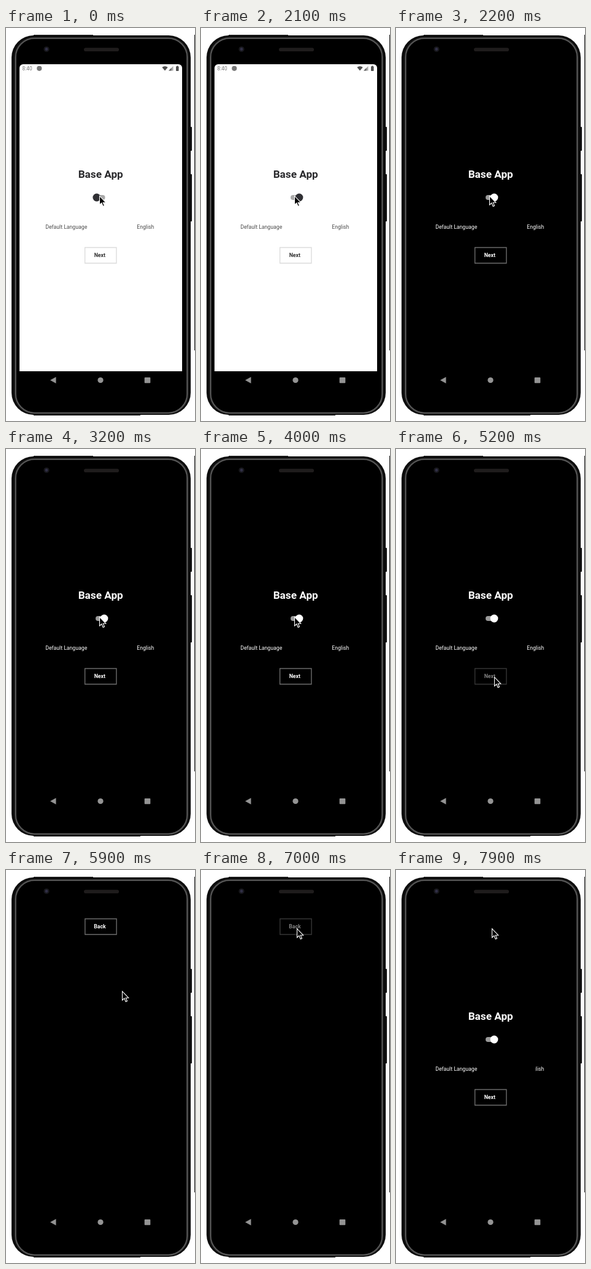
Recreate the animation shown at these times as an HTML page with a canvas. Size 308 by 640 pixels, loop 8000 ms.

```html
<!DOCTYPE html>
<html lang="en">
<head>
<meta charset="utf-8">
<title>Theme switch demo</title>
<style>
  html, body { margin: 0; width: 100%; height: 100%; overflow: hidden; background: #fff; }
  canvas { display: block; }
</style>
</head>
<body>
<canvas id="stage" width="308" height="640"></canvas>
<script>
const ctx = document.getElementById('stage').getContext('2d');
const LOOP = 8000, STEP = 100;

// Times of the hard changes
const TOGGLE = 1200, DARK = 2200, PRESS_NEXT = 4700, OPEN = 5500, PRESS_BACK = 7000, RETURN = 7900;

const LIGHT_THEME = { bg: '#fff', title: '#29292c', text: '#4c4c4c', button: '#333', border: '#dcdcdc', thumb: '#303034', track: '#a9a9a9' };
const DARK_THEME = { bg: '#000', title: '#fff', text: '#fff', button: '#fff', border: '#6c6c6c', thumb: '#fff', track: '#9a9a9a' };
const NAV = '#949494';

// Pointer keys: time, x, y
const POINTER = [
  [0, 152, 273], [4000, 152, 273], [4400, 160, 371], [5600, 160, 371],
  [5900, 189, 197], [6000, 200, 119], [6100, 200, 119], [6400, 156, 95], [LOOP, 156, 95]
];

function poly(points, fill) {
  ctx.beginPath();
  points.forEach(([x, y]) => ctx.lineTo(x, y));
  ctx.closePath();
  ctx.fillStyle = fill;
  ctx.fill();
}

function box(x, y, w, h, r, fill) {
  ctx.beginPath();
  ctx.roundRect(x, y, w, h, r);
  ctx.fillStyle = fill;
  ctx.fill();
}

function ring(x, y, w, h, r, color, width) {
  ctx.beginPath();
  ctx.roundRect(x, y, w, h, r);
  ctx.strokeStyle = color;
  ctx.lineWidth = width;
  ctx.stroke();
}

function disc(x, y, r, fill) {
  ctx.beginPath();
  ctx.arc(x, y, r, 0, Math.PI * 2);
  ctx.fillStyle = fill;
  ctx.fill();
}

function label(text, x, y, size, color, weight = 400, align = 'left') {
  ctx.font = `${weight} ${size}px Roboto, sans-serif`;
  ctx.textAlign = align;
  ctx.fillStyle = color;
  ctx.fillText(text, x, y);
}

function drawPhone() {
  ctx.fillStyle = '#fff';
  ctx.fillRect(0, 0, 308, 640);
  ctx.fillStyle = '#111';
  ctx.fillRect(307, 11, 1, 514);

  // Side keys and shell, with a thin lip at the top and bottom
  box(299, 161, 4, 39, 1, '#151515');
  box(299, 238, 4, 77, 1, '#151515');
  box(9, 12, 292, 618, 36, '#0c0c0c');
  box(45, 11, 97, 1, 0, '#2a2a2a');
  box(45, 630, 174, 1, 0, '#0c0c0c');
  ring(15.5, 16.5, 280, 610.5, 31, '#303030', 3);
  ring(15.7, 16.7, 279.6, 610, 31, '#5c5c5c', 1.5);
  box(17, 18, 277, 607.5, 30, '#000');

  // Camera and speaker
  disc(66, 34.5, 4.6, '#17171b');
  disc(66, 34.5, 2.4, '#302f46');
  box(127, 32.3, 57, 5.7, 2.8, '#1f1c1c');

  // Navigation keys
  poly([[72, 573.5], [81.5, 568.3], [81.5, 578.7]], NAV);
  disc(154, 573.5, 4.6, NAV);
  box(225.7, 569, 9.6, 9.3, 1, NAV);
}

function drawStatus() {
  label('8:40', 26.5, 69, 8.4, '#777');
  disc(54.3, 65.8, 4.1, '#777');
  ctx.beginPath();
  ctx.moveTo(259, 69.5);
  ctx.lineTo(254.3, 64);
  ctx.quadraticCurveTo(259, 60.4, 263.7, 64);
  ctx.closePath();
  ctx.fillStyle = '#505050';
  ctx.fill();
  poly([[265, 69.5], [272.5, 69.5], [272.5, 62]], '#aaa');
  poly([[265, 69.5], [269.5, 69.5], [269.5, 65]], '#666');
  box(277, 62.5, 4.5, 7.5, 0.8, '#505050');
  box(278.3, 61.5, 2, 1.5, 0, '#505050');
}

function drawButton(text, x, y, theme, pressed) {
  ctx.globalAlpha = pressed ? 0.5 : 1;
  ring(x, y, 51.3, 25.5, 0, theme.border, 1.4);
  label(text, x + 24.2, y + 15, 8.7, theme.button, 700, 'center');
  ctx.globalAlpha = 1;
}

function drawToggle(on, theme) {
  box(on ? 146 : 147, 272, on ? 15 : 14.5, 8, 4, theme.track);
  disc(on ? 160 : 147.8, 276, 6.4, theme.thumb);
}

function drawHome(t, theme) {
  label('Base App', 154.2, 244, 17.2, theme.title, 700, 'center');
  drawToggle(t >= TOGGLE, theme);
  label('Default Language', 64.2, 327, 8.7, theme.text);

  // The value is only partly revealed on return
  ctx.save();
  ctx.beginPath();
  ctx.rect(t >= RETURN ? 227.3 : 205, 315, 45, 18);
  ctx.clip();
  label('English', 241.3, 327, 8.7, theme.text, 400, 'right');
  ctx.restore();

  drawButton('Next', 128.6, 357.5, theme, t >= PRESS_NEXT && t < OPEN);
}

function pointerAt(t) {
  const i = POINTER.findIndex(k => k[0] > t);
  const [t0, x0, y0] = POINTER[i - 1], [t1, x1, y1] = POINTER[i];
  const p = (t - t0) / (t1 - t0);
  return [x0 + (x1 - x0) * p, y0 + (y1 - y0) * p];
}

function drawPointer(t) {
  const [x, y] = pointerAt(t);
  ctx.save();
  ctx.translate(Math.round(x) + 0.5, Math.round(y) + 0.5);
  poly([[0, 0], [0, 14.5], [3.3, 11.5], [5.7, 17], [8, 16], [5.7, 10.7], [10.2, 10.7]], '#000');
  ctx.strokeStyle = '#fff';
  ctx.lineWidth = 1.1;
  ctx.stroke();
  ctx.restore();
}

function draw(now) {
  const t = Math.floor((now % LOOP) / STEP) * STEP;
  const dark = t >= DARK;
  const theme = dark ? DARK_THEME : LIGHT_THEME;
  drawPhone();
  box(22, 59, 265, 500, [6, 6, 0, 0], theme.bg);
  if (!dark) drawStatus();
  if (t >= OPEN && t < RETURN) drawButton('Back', 128.8, 79.5, theme, t >= PRESS_BACK);
  else drawHome(t, theme);
  drawPointer(t);
}

let start;
function tick(now) {
  start ??= now;
  draw(now - start);
  requestAnimationFrame(tick);
}
draw(0);
requestAnimationFrame(tick);
</script>
</body>
</html>
```
